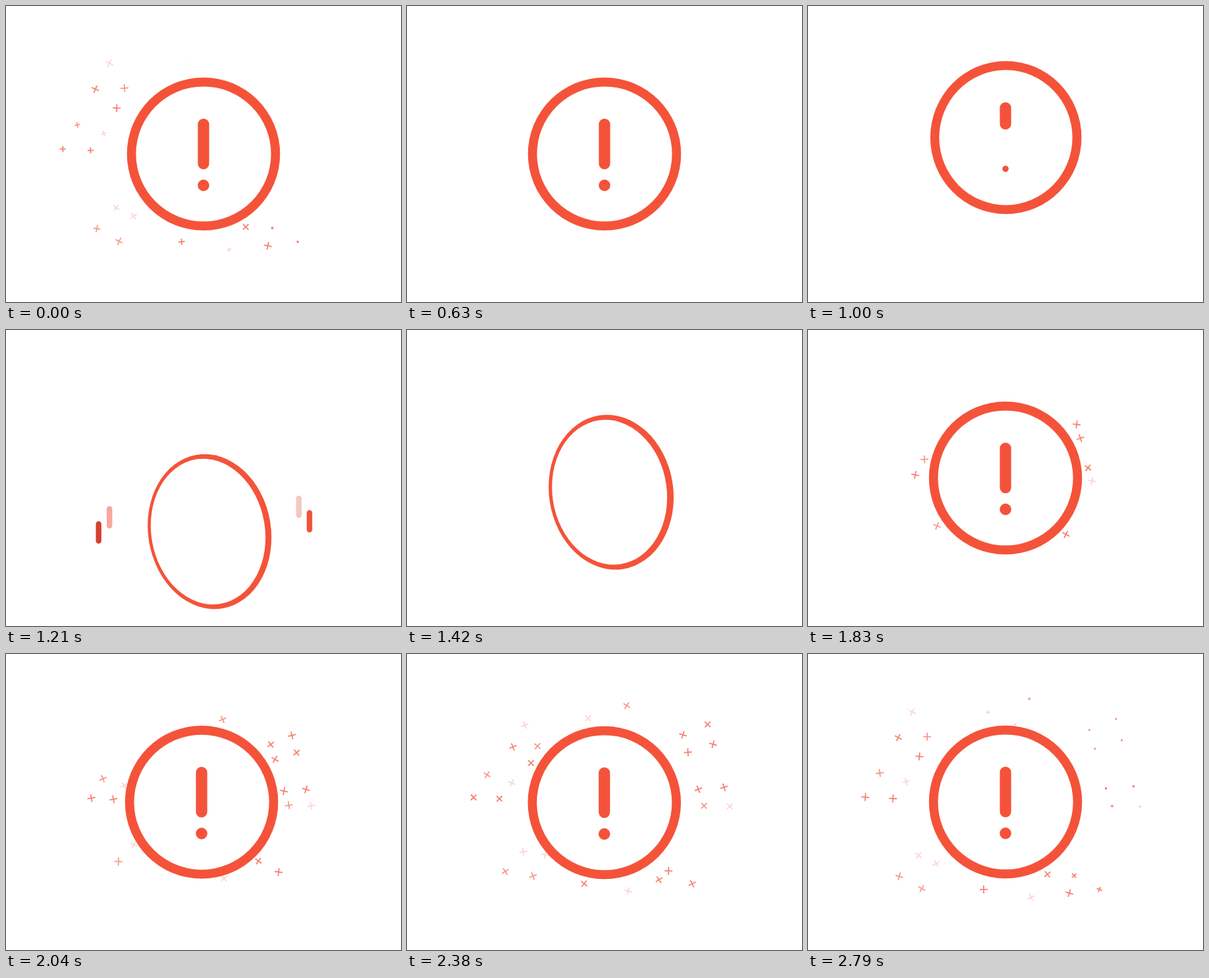
Animation, 600 px wide and 450 px high, one loop 2830 ms. Source, as an HTML page with a canvas:

```html
<!DOCTYPE html>
<html lang="en">
<head>
<meta charset="utf-8">
<title>Alert</title>
<style>
  html, body { margin: 0; width: 100%; height: 100%; overflow: hidden; background: #fff; }
  canvas { display: block; width: 600px; height: 450px; }
</style>
</head>
<body>
<canvas id="stage" width="600" height="450"></canvas>
<script>
const ctx = document.getElementById('stage').getContext('2d');
const LOOP = 2830, RED = '#f4533a', CX = 300, CY = 225, RADIUS = 116.3;
const rad = deg => deg * Math.PI / 180;

// Smooth monotone curve through [time, value] points, held at both ends.
function track(...pts) {
  const slope = i => (pts[i + 1][1] - pts[i][1]) / (pts[i + 1][0] - pts[i][0]);
  const tangent = i => {
    if (i === 0 || i === pts.length - 1) return 0;
    const a = slope(i - 1), b = slope(i);
    return a * b <= 0 ? 0 : 2 * a * b / (a + b);
  };
  return t => {
    if (t <= pts[0][0]) return pts[0][1];
    const i = pts.findIndex(p => p[0] > t) - 1;
    if (i < 0) return pts[pts.length - 1][1];
    const [t0, v0] = pts[i], [t1, v1] = pts[i + 1];
    const h = t1 - t0, u = (t - t0) / h, w = 1 - u;
    return v0 * (1 + 2 * u) * w * w + v1 * u * u * (3 - 2 * u)
      + h * u * w * (tangent(i) * w - tangent(i + 1) * u);
  };
}

const lift = track([880, 0], [1000, -25], [1210, 81], [1275, 109], [1380, 55], [1535, -60],
  [1630, -23.5], [1740, 0], [1900, 0], [2300, 1], [2380, 1], [2500, 0]);
const squeeze = track([960, 0], [1210, 1], [1320, 1.1], [1630, 0.3], [1770, 0]);
const lean = track([960, 0], [1210, 1], [1400, 1.1], [1630, 0.83], [1760, 0]);
const mark = track([930, 1], [1080, 0], [1430, 0], [1630, 1.16], [1760, 1]);
const streakAlpha = track([1090, 0], [1140, 1], [1270, 1], [1340, 0]);

function shake(t) {
  const s = t - 1920;
  return s > 0 ? 6.2 * Math.exp(-s / 160) * Math.sin(s / 160 * 2 * Math.PI) : 0;
}

// Two waves of rays, each ray given as [bearing, reach].
const waves = [
  { birth: 1428, linger: 0, rays: [[43, 195], [193, 196], [332, 200], [2, 204], [353, 196], [283, 161],
    [323, 210], [75, 150], [182, 213], [145, 197], [104, 137], [259, 139]] },
  { birth: 1738, linger: 150, rays: [[211, 190], [134, 183], [55, 169], [224, 197]] }
];
const SHADES = [0.74, 0.6, 0.74, 0.24];
const spread = age => 1 - Math.exp(-age / 417);

// Every ray has an outer spark, and a nearer one if that clears the ring.
const sparks = waves.flatMap(({ birth, linger, rays }) => rays.flatMap(([bearing, reach], i) => {
  const spark = (b, r, shade) => ({
    birth, dir: rad(b), alpha: SHADES[shade % 4], turn: b * 7,
    range: r / spread(2790 - birth),
    end: 2868 + linger + 55 * Math.cos(rad(b - 140))
  });
  const outer = spark(bearing, reach, i);
  const inner = spark(bearing + 6 * Math.sin(rad(bearing)), reach - 42, i + 2);
  return reach - 42 > RADIUS ? [outer, inner] : [outer];
}));

function drawSparks(t) {
  ctx.strokeStyle = RED;
  ctx.lineWidth = 1.8;
  for (const { birth, dir, alpha, turn, range, end } of sparks) {
    const half = 6 * Math.min(1, (end - t) / 100);
    if (t < birth || half <= 0) continue;
    const dist = range * spread(t - birth);
    ctx.save();
    ctx.globalAlpha = alpha;
    ctx.translate(CX + Math.cos(dir) * dist, CY + Math.sin(dir) * dist);
    ctx.rotate(rad(turn - t * 0.1));
    ctx.beginPath();
    ctx.moveTo(-half, 0); ctx.lineTo(half, 0);
    ctx.moveTo(0, -half); ctx.lineTo(0, half);
    ctx.stroke();
    ctx.restore();
  }
}

function pill(x, top, width, length, color) {
  const w = Math.min(width, length);
  ctx.fillStyle = color;
  ctx.beginPath();
  ctx.roundRect(x - w / 2, top, w, length, w / 2);
  ctx.fill();
}

function ellipse(x, y, rx, ry, tilt, color) {
  ctx.fillStyle = color;
  ctx.beginPath();
  ctx.ellipse(x, y, rx, ry, tilt, 0, Math.PI * 2);
  ctx.fill();
}

function drawStreaks(t) {
  const alpha = streakAlpha(t);
  if (alpha <= 0) return;
  const length = 34 * alpha, drift = (1210 - t) * 0.25;
  const streak = (x, y, color) => pill(x, y + drift - length / 2, 8.4, length, color);
  ctx.globalAlpha = alpha;
  streak(140.7, 308, '#d63f30');
  streak(157.2, 285, '#f8a79d');
  streak(444.8, 269, '#f3c8c2');
  streak(461, 291, RED);
  ctx.globalAlpha = 1;
}

function drawSign(t) {
  const q = squeeze(t), bend = q * q, side = lean(t), size = mark(t);
  const rx = RADIUS - 23 * q, ry = RADIUS + 2 * bend;
  const band = 13.7 - 6.8 * Math.min(1, bend), tilt = rad(-9.5 * bend);
  ctx.save();
  ctx.translate(CX + shake(t), CY + lift(t));
  ellipse(9.2 * side, 0, rx, ry, tilt, RED);
  ellipse(7 * side, 0, rx - band, ry - band, tilt, '#fff');
  if (size > 0) {
    pill(0, -53.8, 17.2, 77 * Math.min(size, (1 + size) / 2), RED);
    ellipse(0, 47.6, 8.8 * size, 8.8 * size, 0, RED);
  }
  ctx.restore();
}

function frame() {
  const t = performance.now() % LOOP;
  ctx.fillStyle = '#fff';
  ctx.fillRect(0, 0, 600, 450);
  drawSparks(t < 880 ? t + LOOP : t);
  drawStreaks(t);
  drawSign(t);
  requestAnimationFrame(frame);
}
frame();
</script>
</body>
</html>
```
